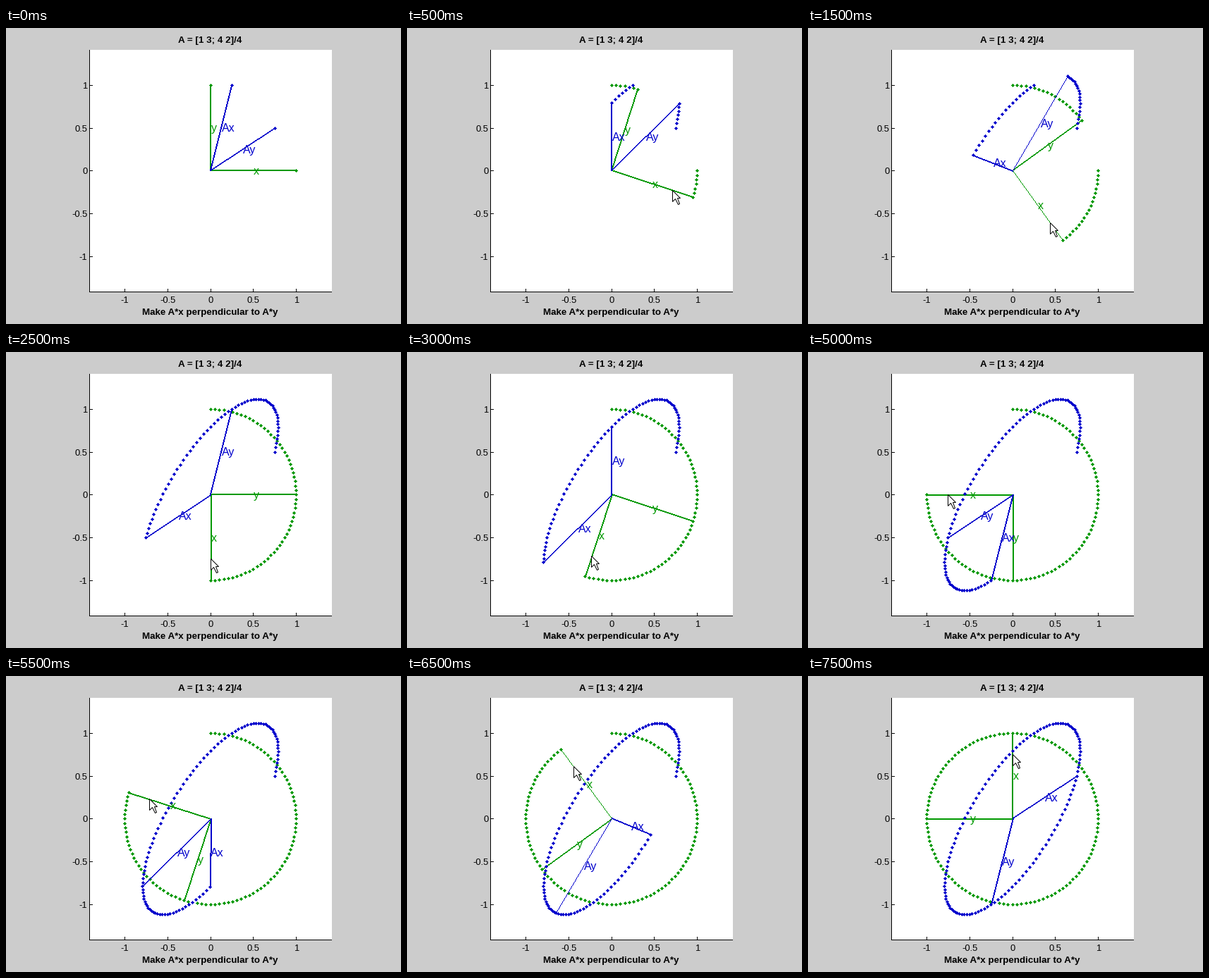
Write a matplotlib script that moves like this. It is 560 px wide and 420 px high and loops after 8000 ms.

```python
import numpy as np
import matplotlib.pyplot as plt
from matplotlib.animation import FuncAnimation
from matplotlib.collections import PolyCollection
from matplotlib.patches import Polygon, Rectangle

W, H, DPI = 560, 420, 100
PT = 72 / DPI                      # one pixel in points
CENTER = np.array([290.02, 202.99])
UNIT = 121.5
GREEN, BLUE = (0, 0.6, 0), (0, 0, 0.8)
STEP, DOT_STEP = 18, 3             # degrees per frame, degrees per dot
FRAMES = 16
A = np.array([[1, 3], [4, 2]]) / 4

plt.rcParams["font.family"] = "Liberation Sans"
fig = plt.figure(figsize=(W / DPI, H / DPI), dpi=DPI, facecolor="#cccccc")
ax = fig.add_axes([0, 0, 1, 1])
ax.set_xlim(0, W)
ax.set_ylim(H, 0)
ax.axis("off")


def to_px(p):
    """Data points to stage pixels."""
    return CENTER + np.asarray(p) * [UNIT, -UNIT]


def unit(deg):
    t = np.radians(deg)
    return np.stack([np.cos(t), np.sin(t)], axis=-1)


def box(x, y, w, h, color):
    ax.add_patch(Rectangle((x, y), w, h, fc=color, lw=0, zorder=0))


def text(x, y, s, size=13, **kw):
    return ax.text(x, y, s, fontsize=size * PT, va="baseline", **kw)


def bar(x, y, w=1):
    """A one pixel high run of w pixels."""
    return [(x, y), (x + w, y), (x + w, y + 1), (x, y + 1)]


def dot(x, y, r=2):
    """A pixel diamond, built row by row."""
    return [bar(x - r + abs(i), y + i, 2 * (r - abs(i)) + 1)
            for i in range(-r, r + 1)]


def stroke(root, tip):
    """An unsmoothed line, one or two pixels wide depending on its slope."""
    d = tip - root
    n = int(abs(d).max())
    pixels = np.round(root + np.outer(np.arange(n + 1) / n, d))
    slope = np.degrees(np.arctan2(abs(d[1]), abs(d[0])))
    if not 45 < slope < 65:
        side = (np.sign(d[1]), 0) if slope > 45 else (0, -np.sign(d[0]))
        pixels = np.concatenate([pixels, pixels + side])
    return [bar(x, y) for x, y in pixels]


# Fixed plot frame
box(118, 31, 344, 344, "white")
box(118, 31, 1, 344, "black")
box(118, 374, 344, 1, "black")
for v in np.linspace(-1, 1, 5):
    x, y = np.floor(to_px((v, v)))
    box(x, 370, 1, 5, "black")
    box(118, y, 5, 1, "black")
    text(x + 0.5, 390, f"{v:g}", ha="center")
    text(115.5, y + 5, f"{v:g}", ha="right")
for y, s in ((21, "A = [1 3; 4 2]/4"), (407, "Make A*x perpendicular to A*y")):
    text(289.3, y, s, 13.33, ha="center", weight="bold")


class Vector:
    """A labelled arm from the centre that leaves a dotted trail."""

    def __init__(self, name, start, matrix, color, z):
        self.start, self.matrix = start, matrix
        self.ink = PolyCollection([], facecolors=[color], linewidths=0,
                                  zorder=z)
        ax.add_collection(self.ink, autolim=False)
        self.label = text(0, 0, name, 16, color=color, zorder=8)

    def update(self, k):
        angles = self.start - np.arange(0, STEP * k + 1, DOT_STEP)
        path = to_px(unit(angles) @ self.matrix.T)
        spots = np.floor(path + 1e-6)
        ink = stroke(np.floor(CENTER), spots[-1])
        for x, y in spots:
            ink += dot(x, y)
        self.ink.set_verts(ink)
        x, y = (CENTER + path[-1]) / 2
        self.label.set_position((x + 0.5, y + 5))


vectors = [Vector("x", 0, np.eye(2), GREEN, 2),
           Vector("y", 90, np.eye(2), GREEN, 2),
           Vector("Ax", 0, A, BLUE, 4),
           Vector("Ay", 90, A, BLUE, 4)]

ARROW = np.array([(0, 0), (0, 16), (4, 12), (8, 20), (10, 19),
                  (7, 11), (11, 11)]) + 0.5
cursor = Polygon(ARROW, closed=True, fc="white", ec="black", lw=PT,
                 joinstyle="miter", zorder=10)
ax.add_patch(cursor)


def draw(k):
    for v in vectors:
        v.update(k)
    tip = np.floor(to_px(0.75 * unit(-STEP * k)) - (0, 0.4))
    cursor.set_xy(ARROW + tip)
    cursor.set_visible(k > 0)
    return []


anim = FuncAnimation(fig, draw, frames=FRAMES, interval=500,
                     repeat=True, repeat_delay=0, blit=False)
plt.show()
```
